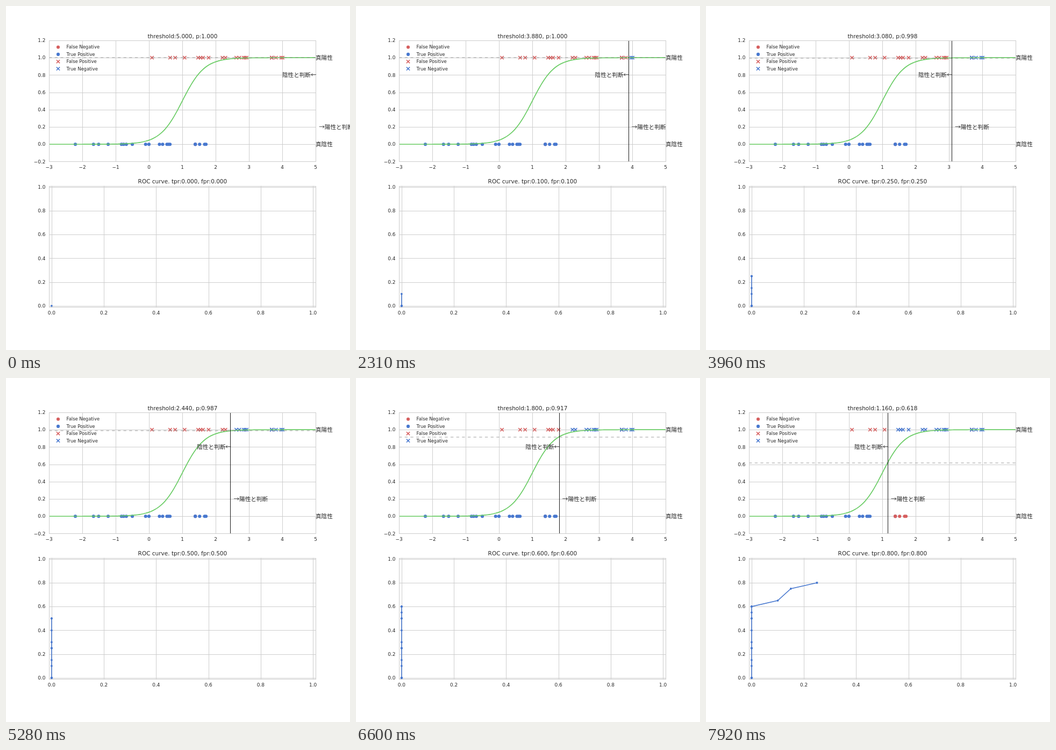
Recreate the animation shown at these times as an HTML page with a canvas. Size 640 by 640 pixels, loop 8 s.

```html
<!DOCTYPE html>
<html lang="ja">
<head>
<meta charset="utf-8">
<title>Threshold and ROC curve</title>
<style>
html, body { margin: 0; width: 100%; height: 100%; overflow: hidden; background: #fff; }
canvas { display: block; width: 640px; height: 640px; }
</style>
</head>
<body>
<canvas id="stage" width="640" height="640"></canvas>
<script>
const LOOP = 8000, STEP = 330;
const RED = '#d65f5f', BLUE = '#4878cf', GREEN = '#6acc65', GRID = '#cccccc', INK = '#262626';
const LINE = 1.56;
const LATIN = '"DejaVu Sans", sans-serif';
const KANJI = '"Noto Sans CJK JP", "Noto Sans CJK", sans-serif';

const positives = [0.09, 0.635, 0.785, 1.07, 1.475, 1.55, 1.62, 1.79, 2.205, 2.295,
  2.62, 2.71, 2.84, 2.885, 2.93, 3.685, 3.685, 3.81, 3.97, 4.01];
const negatives = [-2.21, -1.665, -1.51, -1.225, -0.825, -0.76, -0.68, -0.5, -0.1, 0,
  0.315, 0.41, 0.54, 0.585, 0.63, 1.39, 1.39, 1.52, 1.67, 1.71];

const ctx = document.getElementById('stage').getContext('2d');

function makePlot(top, bottom, x0, x1, y0, y1) {
  return {
    top, bottom,
    x: v => 80 + 496 * (v - x0) / (x1 - x0),
    y: v => bottom - (bottom - top) * (v - y0) / (y1 - y0)
  };
}
const upper = makePlot(64, 289.4545, -3, 5, -0.2, 1.2);
const lower = makePlot(334.5455, 560, -0.01, 1.01, -0.01, 1.01);

const sigmoid = x => 1 / (1 + Math.exp(-3 * (x - 1)));
const thresholdAt = step => 5 - 0.16 * step;
const rate = (values, limit) => values.filter(v => v > limit).length / values.length;
const snap = v => Math.round(v) + 0.5;
const range = (from, to, step) =>
  Array.from({ length: Math.round((to - from) / step) + 1 }, (_, i) => from + i * step);

function text(str, x, y, size, align = 'left', family = LATIN) {
  ctx.font = `${size}px ${family}`;
  ctx.textAlign = align;
  ctx.fillStyle = INK;
  ctx.fillText(str, x, y);
}

function stroke(points, color, width) {
  ctx.beginPath();
  points.forEach(([x, y]) => ctx.lineTo(x, y));
  ctx.strokeStyle = color;
  ctx.lineWidth = width;
  ctx.stroke();
}

function dot(x, y, color, r = 3.1) {
  ctx.beginPath();
  ctx.arc(x, y, r, 0, 2 * Math.PI);
  ctx.fillStyle = color;
  ctx.fill();
}

function cross(x, y, color, r = 3.1) {
  stroke([[x - r, y - r], [x + r, y + r]], color, LINE);
  stroke([[x - r, y + r], [x + r, y - r]], color, LINE);
}

function grid(plot, xs, ys, digits) {
  const label = (v, d) => Math.abs(v).toFixed(d).replace(/^/, v < -1e-9 ? '\u2212' : '');
  for (const v of xs) {
    const x = plot.x(v);
    stroke([[snap(x), plot.top], [snap(x), plot.bottom]], GRID, 0.95);
    text(label(v, digits), x, plot.bottom + 13.6, 8.89, 'center');
  }
  for (const v of ys) {
    const y = plot.y(v);
    stroke([[80, snap(y)], [576, snap(y)]], GRID, 0.95);
    text(label(v, 1), 73.4, y + 3.2, 8.89, 'right');
  }
}

function frame(plot) {
  ctx.strokeStyle = GRID;
  ctx.lineWidth = 1;
  const top = snap(plot.top);
  ctx.strokeRect(80.5, top, 496, snap(plot.bottom) - top);
}

function legend() {
  [['False Negative', dot, RED], ['True Positive', dot, BLUE],
   ['False Positive', cross, RED], ['True Negative', cross, BLUE]]
    .forEach(([name, mark, color], i) => {
      const y = 76.5 + 13.4 * i;
      mark(97, y, color);
      text(name, 112.6, y + 2.8, 8.42);
    });
}

function drawClasses(limit) {
  const p = sigmoid(limit), { x, y } = upper, lineX = snap(x(limit));
  grid(upper, range(-3, 5, 1), range(-0.2, 1.2, 0.2), 0);

  // Legend samples sit beneath the classified marks.
  dot(x(1.39), y(0), limit < 1.39 ? BLUE : RED);
  cross(x(3.685), y(1), limit < 3.685 ? RED : BLUE);
  negatives.forEach(v => dot(x(v), y(0), v > limit ? RED : BLUE));
  positives.forEach(v => cross(x(v), y(1), v > limit ? BLUE : RED));

  stroke(range(-3, 5, 0.05).map(v => [x(v), y(sigmoid(v))]), GREEN, 1.7);
  ctx.setLineDash([5.33, 5.33]);
  const dashY = Math.round(y(p));
  stroke([[80, dashY], [576, dashY]], 'rgba(128,128,128,0.5)', LINE);
  ctx.setLineDash([]);
  stroke([[lineX, upper.top], [lineX, upper.bottom]], '#000', 0.9);
  frame(upper);
  legend();

  text('陰性と判断←', x(limit - 1), y(0.8) + 4, 10.6, 'left', KANJI);
  text('→陽性と判断', x(limit + 0.1), y(0.2) + 3.6, 10.6, 'left', KANJI);
  text('真陽性', 576, y(1) + 4, 10.6, 'left', KANJI);
  text('真陰性', 576, y(0) + 4, 10.6, 'left', KANJI);
  text(`threshold:${limit.toFixed(3)}, p:${p.toFixed(3)}`, 328.4, 59.8, 10.5, 'center');
}

function drawRoc(step) {
  const ticks = range(0, 1, 0.2);
  grid(lower, ticks, ticks, 1);
  const points = range(0, step, 1).map(i => {
    const limit = thresholdAt(i);
    return [lower.x(rate(negatives, limit)), lower.y(rate(positives, limit))];
  });
  stroke(points, BLUE, LINE);
  points.forEach(([x, y]) => dot(x, y, BLUE, 1.9));
  frame(lower);
  const tpr = rate(positives, thresholdAt(step)).toFixed(3);
  text(`ROC curve. tpr:${tpr}, fpr:${tpr}`, 328.4, 329.8, 10.5, 'center');
}

function render(now) {
  const step = Math.floor((now % LOOP) / STEP);
  ctx.fillStyle = '#fff';
  ctx.fillRect(0, 0, 640, 640);
  drawClasses(thresholdAt(step));
  drawRoc(step);
}

const start = performance.now();
function tick() {
  render(performance.now() - start);
  requestAnimationFrame(tick);
}
tick();
</script>
</body>
</html>
```
